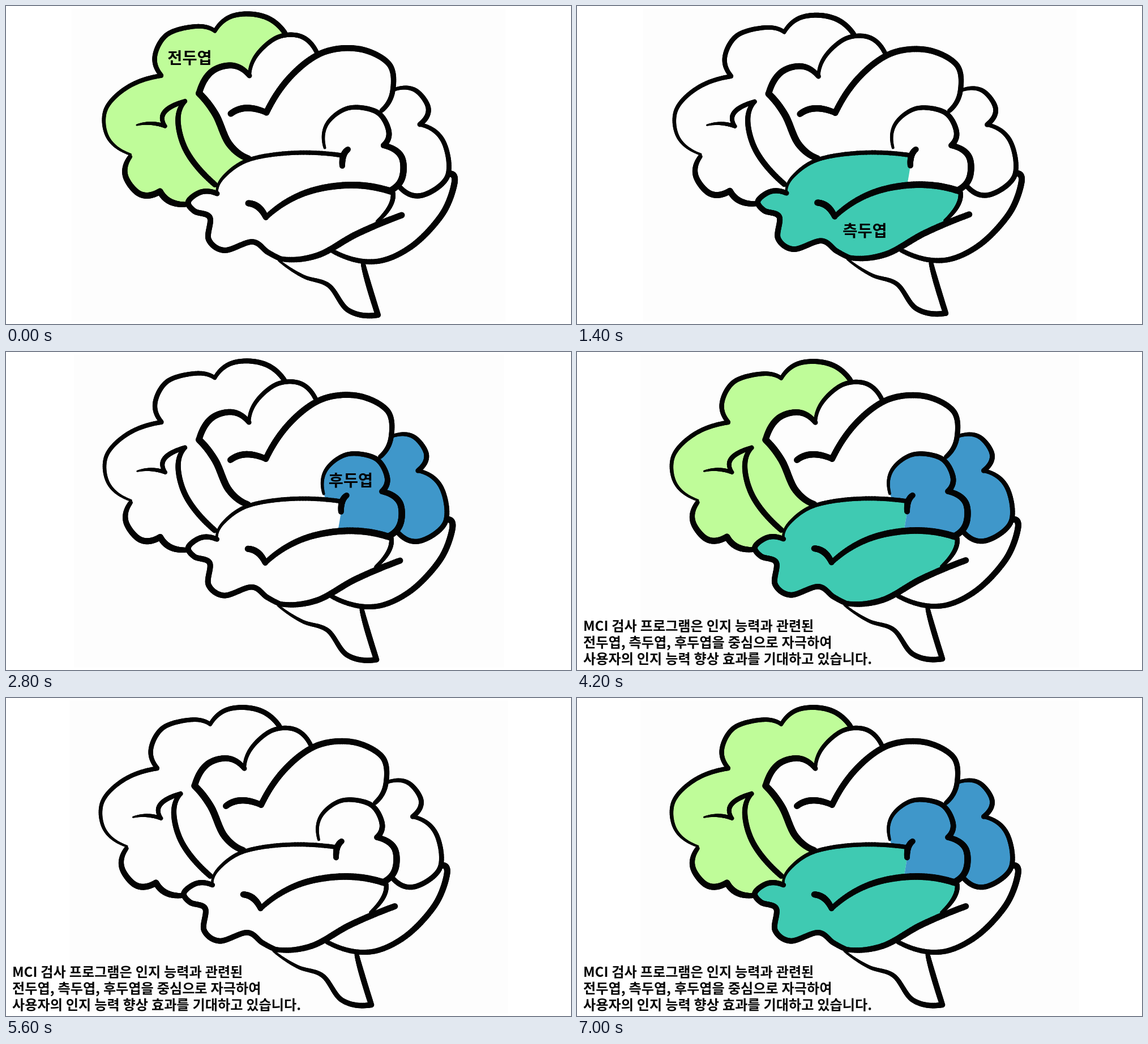
An HTML page with a canvas for the animation above (8000 ms loop, 998 px wide and 561 px high).

```html
<!DOCTYPE html>
<html lang="ko">
<head>
<meta charset="utf-8">
<title>뇌</title>
<style>
  html, body { margin: 0; width: 100%; height: 100%; overflow: hidden; background: #fff; }
  canvas, svg { position: absolute; left: 0; top: 0; width: 998px; height: 561px; }
  text { font-family: "Noto Sans CJK KR", "Noto Sans CJK", "Noto Sans CJK JP", sans-serif; font-weight: 700; fill: #050505; }
  .label { font-size: 28.4px; text-anchor: middle; }
  .caption { font-size: 24.15px; word-spacing: -.8px; }
</style>
</head>
<body>
<canvas id="brain" width="998" height="561"></canvas>
<svg viewBox="0 0 998 561">
  <text class="label" data-scene="0" x="324.5" y="102">전두엽</text>
  <text class="label" data-scene="1" x="508.5" y="407">측두엽</text>
  <text class="label" data-scene="2" x="609" y="237">후두엽</text>
  <g class="caption" data-scene="345">
    <text x="11" y="491.5">MCI 검사 프로그램은 인지 능력과 관련된</text>
    <text x="11" y="520.5">전두엽, 측두엽, 후두엽을 중심으로 자극하여</text>
    <text x="11" y="549.5">사용자의 인지 능력 향상 효과를 기대하고 있습니다.</text>
  </g>
</svg>
<script>
const ctx = document.getElementById('brain').getContext('2d');
const STEPS = 16;
const lines = {};

// Catmull-Rom through a few key points; the ends continue as parabolas
function curve(text) {
  const pts = text.split(' ').map(p => p.split(',').map(Number));
  const beyond = (a, b, c) => a.map((v, n) => 3 * v - 3 * b[n] + c[n]);
  const ext = [beyond(...pts), ...pts, beyond(...pts.slice(-3).reverse())];
  const out = [];
  for (let i = 0; i < pts.length - 1; i++) {
    const [a, b, c, d] = ext.slice(i, i + 4);
    for (let k = 0; k < STEPS; k++) {
      const t = k / STEPS;
      out.push([0, 1].map(n => b[n] + t / 2 * (c[n] - a[n]
        + t * (2 * a[n] - 5 * b[n] + 4 * c[n] - d[n]
        + t * (3 * (b[n] - c[n]) + d[n] - a[n])))));
    }
  }
  return [...out, pts[pts.length - 1]];
}

function line(name, from, to, points) {
  lines[name] = { from, to, pts: curve(points) };
}

line('crown', 8, 7, '274,122 263,88 285,50 335,36 369,44');
line('top', 7, 9, '369,44 394,20 430,14 466,23 493,48');
line('brow', 8, 4, '274,123 215,143 176,183 180,232 220,262');
line('chin', 8, 11, '219,266 211,300 237,332 272,327');
line('chinTip', 11, 9, '272,327 290,345 318,350');
line('hook', 3, 7, '231,210 256,207 281,212');
line('hookTop', 7, 8, '281,212 280,187 316,168');
line('gyrus', 8, 10, '316,168 304,205 321,260 369,315');
line('arch', 6, 8, '430,123 443,86 480,55 522,54 550,84');
line('heart', 9, 11, '430,123 400,105 363,116 341,154');
line('sulcus', 12, 11, '341,154 370,191 394,243 428,269');
line('wing', 11, 10, '397,190 425,180 460,188');
line('dome', 11, 8, '460,188 503,124 560,82 625,76 677,103 683,150 664,184');
line('back', 6, 9, '684,148 722,148 746,180 731,209');
line('backLow', 7, 9, '731,209 772,238 780,300 735,334 696,320');
line('knob', 5, 10, '563,250 567,208 605,180 655,187 676,220 667,246');
line('knobLow', 10, 11, '667,246 698,265 700,302 680,325');
line('fissure', 4, 8, '373,331 385,301 430,271 510,259 597,264');
line('tick', 10, 10, '604,253 596,264 594,282');
line('snout', 9, 9, '373,331 345,328 322,345 333,362 360,373 358,412 386,431 435,416 462,434 485,446');
line('base', 9, 11, '485,446 550,440 620,402 699,369');
line('flank', 8, 6, '683,327 679,352 656,380');
line('beak', 11, 10, '428,348 446,355 459,373');
line('middle', 9, 12, '459,373 525,331 605,316 680,327');
line('cerebellum', 11, 8, '783,296 792,313 770,368 715,425 650,451 578,433');
line('stem', 4, 10, '482,449 525,477 570,493 605,537 657,545');
line('stemBack', 10, 8, '657,545 640,490 631,456');

// Part of a line between two of its key points, forwards or reversed
const part = (name, from = 0, to = Infinity) =>
  lines[name].pts.slice(from * STEPS, to * STEPS + 1);
const rev = (...range) => part(...range).reverse();
const seam = curve('594,282 591,301 588,317');

const lobes = {
  frontal: { color: '#bffc99', shapes: [[
    part('crown'), part('top'), rev('arch', 0, 2), part('heart'), part('sulcus'),
    rev('fissure', 0, 2), part('snout', 0, 2), rev('chinTip'), rev('chin'), rev('brow')]] },
  temporal: { color: '#3fcab2', shapes: [[
    part('fissure'), seam, part('middle', 2), part('flank'), rev('base', 0, 2), rev('snout')]] },
  occipital: { color: '#3f97ca', shapes: [
    [part('knob'), part('knobLow'), rev('middle', 2), [...seam].reverse(), [[597, 264], [567, 261]]],
    [part('back'), part('backLow'), rev('knobLow', 0, 2), rev('knob', 3), rev('dome', 5)]] }
};

function fillLobe({ color, shapes }) {
  ctx.fillStyle = color;
  for (const shape of shapes) {
    ctx.beginPath();
    shape.flat().forEach(p => ctx.lineTo(...p));
    ctx.fill();
  }
}

// Pen pressure runs from one width to the other and swells midway
function brush({ from, to, pts }) {
  const last = pts.length - 1;
  for (let i = 0; i < last; i++) {
    const u = i / last;
    ctx.lineWidth = from + (to - from) * u + Math.sin(Math.PI * u);
    ctx.beginPath();
    ctx.moveTo(...pts[i]);
    ctx.lineTo(...pts[i + 1]);
    ctx.stroke();
  }
}

const SCENE = 1400, LOOP = 8000;
const wide = { scale: .988, x: -3.8, y: 2.8, left: 112, right: 887 };
const all = Object.keys(lobes);
const scenes = [
  { scale: 1, x: 0, y: 0, left: 116, right: 882, show: ['frontal'] },
  { scale: .99, x: .8, y: 2.4, left: 117, right: 882, show: ['temporal'] },
  { scale: .992, x: 2.6, y: 2, left: 120, right: 880, show: ['occipital'] },
  { ...wide, show: all },
  { ...wide, show: [] },
  { ...wide, show: all }
];
const texts = document.querySelectorAll('[data-scene]');

function draw(index) {
  const { scale, x, y, left, right, show } = scenes[index];
  ctx.setTransform(1, 0, 0, 1, 0, 0);
  ctx.clearRect(0, 0, 998, 561);
  ctx.fillStyle = '#fdfdfd';
  ctx.fillRect(left, 4, right - left, 553);
  ctx.setTransform(scale, 0, 0, scale, x, y);
  show.forEach(name => fillLobe(lobes[name]));
  ctx.strokeStyle = '#040404';
  ctx.lineCap = 'round';
  Object.values(lines).forEach(brush);
  texts.forEach(t => {
    t.style.visibility = t.dataset.scene.includes(index) ? 'visible' : 'hidden';
  });
}

let current = -1;
const began = performance.now();
function tick() {
  const index = Math.floor((performance.now() - began) % LOOP / SCENE);
  if (index !== current) draw(current = index);
  requestAnimationFrame(tick);
}
tick();
</script>
</body>
</html>
```
